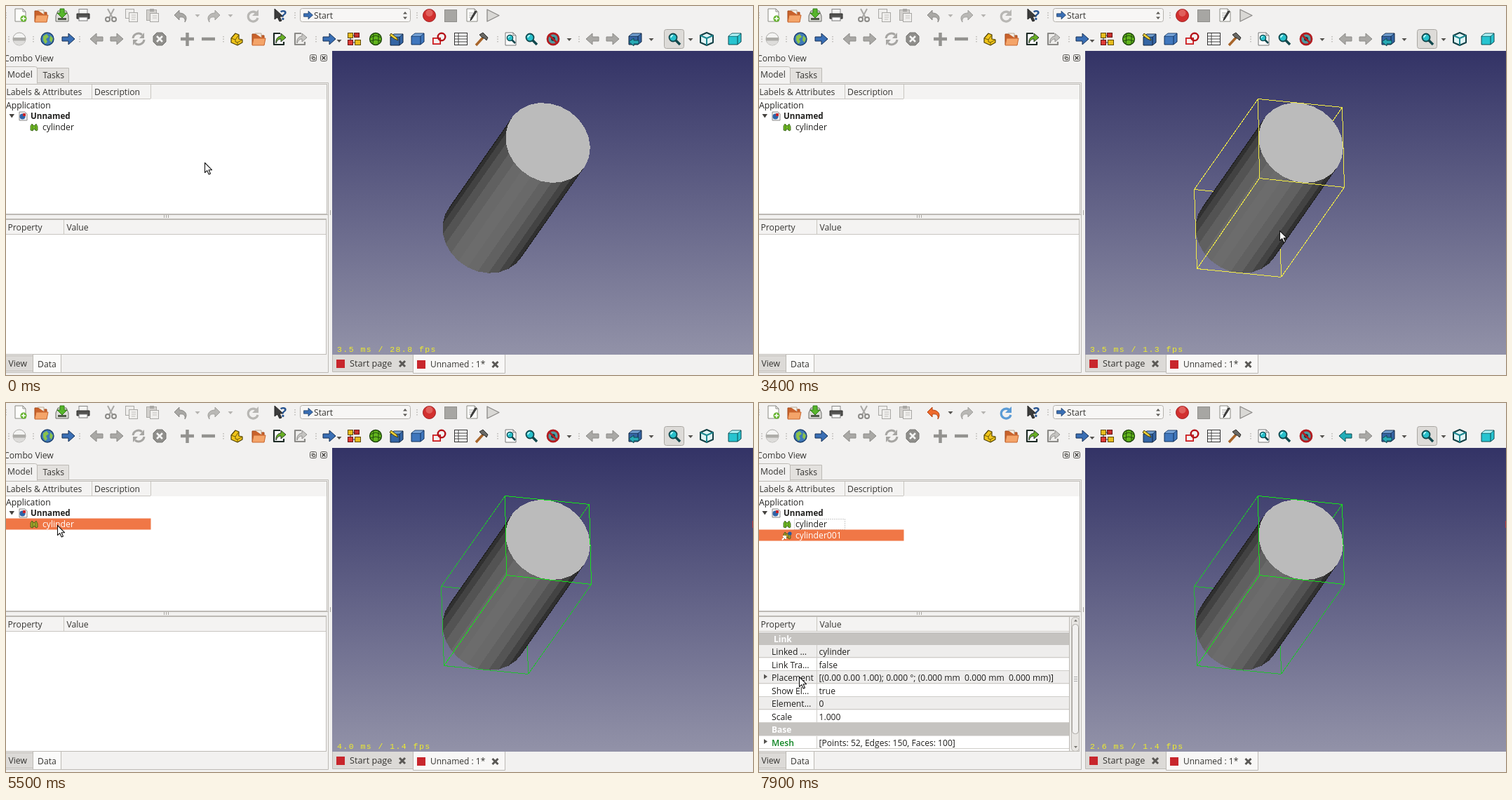
An HTML page that plays this animation: 1065 by 526 pixels, repeating every 8000 ms.

```html
<!DOCTYPE html>
<html lang="en">
<head>
<meta charset="utf-8">
<title>Mesh link demo</title>
<style>
html, body { margin: 0; width: 100%; height: 100%; overflow: hidden; background: #f2f1f0; }
svg { display: block; width: 1065px; height: 526px; }
text { font-family: "Open Sans", "Noto Sans", sans-serif; white-space: pre; }
#fps { font-family: "Liberation Mono", monospace; letter-spacing: 1.45px; }
</style>
</head>
<body>
<svg id="stage" viewBox="0 0 1065 526" xmlns="http://www.w3.org/2000/svg"></svg>
<script>
// ---- drawing helpers ----
const rect = (x, y, w, h, f, s = 'none', r = 0) =>
  `<rect x="${x}" y="${y}" width="${w}" height="${h}" fill="${f}" stroke="${s}" rx="${r}"/>`;
const path = (d, f = 'none', s = 'none', w = 1) =>
  `<path d="${d}" fill="${f}" stroke="${s}" stroke-width="${w}" stroke-linejoin="round"/>`;
const circ = (x, y, r, f, s = 'none', w = 1) =>
  `<circle cx="${x}" cy="${y}" r="${r}" fill="${f}" stroke="${s}" stroke-width="${w}"/>`;
const text = (x, y, s, f = '#353431', size = 12.2, weight = 400, id = '') =>
  `<text x="${x}" y="${y}" fill="${f}" font-size="${size}" font-weight="${weight}"${id && ` id="${id}"`}>${s}</text>`;
const at = (x, y, ...parts) => `<g transform="translate(${x} ${y})">${parts.join('')}</g>`;
const flip = s => `<g transform="scale(-1 1)">${s}</g>`;
const group = (id, ...parts) => `<g id="${id}">${parts.join('')}</g>`;
const line = (a, b) => `M${a}L${b}`;

// ---- icons, centred on 0,0 ----
const GREY = '#a9a8a5', DARK = '#8b8a87';
const arrow = (f, s) => path('M-9-3H0V-8L9 0L0 8V3H-9Z', f, s);
const drop = (x, y, f = '#8f8e8a') => path(`M${x - 3.5} ${y - 2}h7l-3.5 4Z`, f);
const grip = (x, y) => `<path d="M${x} ${y - 4}v9" stroke="#b9b7b3" stroke-width="1.5" stroke-dasharray="1.5 2"/>`;
const undo = (f, s) => path('M-9-1L-2-8V-4C6-4 11 2 6 9C7 3 4 1-2 2V6Z', f, s);
const reload = c => path('M6-3A7 7 0 1 0 7 3', 'none', c, 3.2) + path('M8-9V0H-1Z', c);
const page = (f = '#fdfdfb', s = '#8a8a84') => path('M-7-9H4L8-5V9H-7Z', f, s) + path('M4-9V-5H8', 'none', s);
const folder = path('M-9-7H-2L0-5H8V8H-9Z', '#c9622b', '#a3481b') + path('M-7-1H10L8 9H-9Z', '#f4a469', '#c9662e') + path('M-5-8H4V-2', '#f6efe6', '#b9a995');
const cube = (f, top, s) => path('M-9-4L-4-8H9V4L4 8H-9Z', f, s) + path('M-9-4H4V8M4-4L9-8', 'none', s) + path('M-8.500-4.200L-4-7.500H8L4-4.200Z', top);
const lens = c => path('M2 2L8 8', 'none', '#12484d', 3.5) + circ(-2, -2, 5.5, c, '#12484d', 1.8) + path('M-5-2A3 3 0 0 1-2-5', 'none', '#c8ffff', 1.6);
const share = (g, s, f) => path('M2-8H-7V8H7V4', f, s, 2.2) + path('M-4 6C-5 0-1-4 3-4V-8L10-2L3 4V0C-1 0-3 3-4 6Z', g, s, .9);
const mesh = f => path('M-5 4V-2L-3-5L0-2L3-5L5-1V4L3 5L0 2L-2 5Z', f, '#234d0c', .7) + path('M-2-4V4M2-3V4', 'none', '#315c16', .7);

function toolbars() {
  const top = [
    at(20, 13, page(), circ(5, 5, 4.5, '#65b32e'), path('M5 2V8M2 5H8', 'none', '#fff', 1.5)),
    at(50, 14, folder),
    at(80, 13, path('M-9 1L-6-6H6L9 1V9H-9Z', '#dcdcd8', '#6b6b67'), rect(-6, 4, 12, 3, '#4f5a48'), path('M-3-9H3V-3H7L0 4L-7-3H-3Z', '#57b62c', '#2d7a12')),
    at(110, 13, rect(-6, -8.5, 12, 8, '#f4f4f2', '#888'), path('M-9-2H9V5H-9Z', '#525250', '#2d2d2b'), rect(-6, 3, 12, 5, '#fafafa', '#777')),
    at(149, 13, path('M-4-9L3 4M5-9L-2 4', 'none', GREY, 2), circ(-4, 6, 3, 'none', DARK, 2), circ(5, 6, 3, 'none', DARK, 2)),
    at(179, 13, rect(-8.5, -8.5, 12, 13, '#efeeec', GREY), rect(-3.5, -3.5, 12, 13, '#efeeec', GREY), path('M0 0H6M0 3H6M0 6H5', 'none', '#c4c2bf')),
    at(209, 13, rect(-8.5, -7.5, 14, 15, '#d2d0cd', GREY), rect(-4, -9, 6, 4, GREY), rect(-3.5, -2.5, 12, 12, '#efeeec', GREY), path('M0 1H6M0 4H6', 'none', '#c4c2bf')),
    group('undoOff', at(249, 14, undo(GREY, DARK)), drop(273, 14, '#b5b3b0'), at(352, 14, reload('#b8b7b4'))),
    group('undoOn', at(249, 14, undo('#ee6a2c', '#b5400f')), drop(273, 14, '#55534f'), at(352, 14, reload('#5b9bd5'))),
    at(296, 14, flip(undo('#b9b8b5', '#a2a19e'))), drop(320, 14, '#b5b3b0'),
    at(391, 13, path('M-8-9V6L-4 3L-1 9L2 8L-1 2H4Z', '#3c3c3c', '#222'), text(0, 7, '?', '#27538f', 19, 700)),
    rect(419.5, 3.5, 157, 19, '#f7f6f5', '#b4b1ac', 3), at(431, 13, `<g transform="scale(.72)">${arrow('#3a6fb5', '#18375f')}</g>`),
    text(439, 17.500, 'Start'), path('M566 11.500l3-3.500l3 3.500ZM566 15.500l3 3.500l3-3.500Z', '#5c5a56'),
    circ(603.5, 13.5, 9, '#d2302f', '#a11d1f'), circ(603.5, 10, 5, '#e0605c'),
    rect(625.5, 5.5, 17, 17, '#a7a6a3', '#8f8e8b'),
    at(664, 13, page(), path('M-4-3H4M-4 0H4M-4 3H2', 'none', '#aaa'), path('M7-5L0 6L-2 8L-1 4L5-6Z', '#4a4a48', '#2a2a2a')),
    path('M686 5V22L703 13.500Z', '#d9d8d5', DARK, 1.3)
  ];
  const low = [
    at(19, 47, circ(0, 0, 9, '#f4f4f3', GREY), path('M-9 0A9 9 0 0 0 9 0Z', '#dddcda'), rect(-9, -2, 18, 4.5, '#aeada9')),
    at(59, 47, circ(0, 0, 9, '#3f79b9', '#1b3f6d', 1.4), path('M-6-4L-1-7L2-3L-2 0L0 4L-3 7L-6 2ZM4-5L8-1L6 5L3 2Z', '#8bc34a')),
    at(89, 47, arrow('#3a6fb5', '#142f55')),
    at(129, 47, flip(arrow(GREY, DARK))), at(158, 47, arrow(GREY, DARK)),
    at(189, 47, path('M-8-1A8 8 0 0 1 5-6M8 1A8 8 0 0 1-5 6', 'none', '#a6a5a2', 3), path('M8-9V-1H1ZM-8 9V1H-1Z', '#a6a5a2')),
    at(219, 47, path('M-4-9H4L9-4V4L4 9H-4L-9 4V-4Z', '#8f8e8b', '#777673'), path('M-4-4L4 4M4-4L-4 4', 'none', '#f5f5f4', 2.5)),
    path('M249 47H268M258.500 38V57', 'none', '#93928f', 4.500), path('M279 47H298', 'none', '#93928f', 4.500),
    at(329, 47, path('M-8-1L-2-8L3-6V0L8 1V5L1 9L-8 5Z', '#f0c419', '#4f4106', 1.2), path('M-8-1L-2 1L3-6M-2 1V4L1 5L8 1M1 5V9', 'none', '#6f5c0a')),
    at(360, 47, folder),
    group('hot', rect(376.5, 33.5, 27, 27, '#fbfbfa', '#a7a49f', 3)),
    at(389, 47, share('#68b023', '#1d2a25', '#fafafa')), at(419, 47, share('#c5c4c1', '#8b8a87', '#eeedeb')),
    at(461, 47, arrow('#3a6fb5', '#142f55')), drop(475, 50, '#55534f'),
    at(496, 47, rect(-8.5, -8.5, 7, 7, '#e6bc1d', '#604b08'), rect(.5, -8.500, 7, 6, '#c9312c', '#611'), rect(-8.5, 1.5, 7, 7, '#dd3b35', '#611'), rect(1.5, 1.5, 8, 7, '#e6bc1d', '#604b08'), path('M-1-5H2M-5-2V2M-1 5H2', 'none', '#333')),
    at(527, 47, circ(0, 0, 8.5, '#62b51d', '#1c420a', 1.3), path('M-8-2L0-5L8-2M-8 3L0 1L8 3M-3-8L-4 8M4-8L4 7', 'none', '#1f4a0c')),
    at(557, 48, cube('#3465a4', '#729fcf', '#10243f'), path('M-8-9L0-3L2 1L-3-1L-10-6Z', '#edd03a', '#4d4107')),
    at(587, 47, cube('#4077bd', '#79a5d8', '#10305b')),
    at(617, 47, rect(-8.5, -1.5, 11, 9, 'none', '#b41218'), rect(-7.5, -.5, 9, 7, 'none', '#ee4a4a'), circ(4, -3, 5.3, 'none', '#b41218', 2.4)),
    at(648, 47, rect(-8.5, -8.5, 18, 17, '#fbfbfa', '#333'), path('M-8-4H9M-8 0H9M-8 4H9M-3-8V8', 'none', '#444')),
    at(678, 47, path('M-8 9L3-3', 'none', '#a8652a', 3.5), path('M-3-6L2-9L9-2L7 2L4-1L1-2Z', '#686864', '#30302e')),
    at(719, 47, page('#fdfdfd', '#777'), `<g transform="translate(1 0) scale(.75)">${lens('#28c0cb')}</g>`),
    at(749, 47, lens('#28c0cb')),
    at(780, 47, circ(0, 0, 8, '#4f9ca2', '#b31c20', 2.8), circ(0, 0, 3, '#0f3d42'), path('M-5-5L5 5', 'none', '#b31c20', 2.8)), drop(803, 48, '#55534f'),
    group('backOff', at(836, 47, flip(arrow(GREY, DARK)))), group('backOn', at(836, 47, flip(arrow('#22adb8', '#0c484e')))),
    at(865, 47, arrow(GREY, DARK)),
    at(897, 47, cube('#3465a4', '#729fcf', '#10243f'), path('M-9 4L-2-1V2H5V7H-2V10Z', '#28aab5', '#0c484e')), drop(920, 48, '#55534f'),
    rect(938.5, 33.5, 28, 27, '#dddbd8', '#aaa7a2', 3), at(953, 47, lens('#28c0cb')), drop(976, 48, '#55534f'),
    at(999, 47, path('M0-9L9-5V5L0 9L-9 5V-5Z', '#dff4f5', '#123f44', 2), path('M-9-5L0-1L9-5M0-1V9', 'none', '#1b8891', 2)),
    at(1039, 47, cube('#27c4d0', '#b5f2f5', '#0c484e'))
  ];
  const grips = [[0, 13], [412, 13], [586, 13], [4, 47], [39, 47], [105, 47], [310, 47], [442, 47], [701, 47], [817, 47]];
  return top.join('') + low.join('') + grips.map(g => grip(...g)).join('');
}

// ---- left panel ----
const LINE = '#bdbab5', WHITE = '#fff', INK = '#1f1e1c';
const smallBtn = x => rect(x - 4.5, 69.5, 9, 9, '#f2f1f0', '#55534f', 2);
const treeRow = (y, f) => rect(0, y, 206.5, 16, f);

function propRow(i, name, value, open) {
  const mid = 336 + 18.5 * i, y = Math.round(mid - 9.5);
  if (!value) return rect(0, y, 456, 18.5, '#c5c3c0') + text(name === 'Link' ? 21 : 18, mid + 4.5, name, WHITE, 12, 700);
  const green = name === 'Mesh' && i > 2;
  return rect(0, y, 456, 19, i % 2 ? '#eeedec' : WHITE) +
    path(`M0 ${y + 17.5}H456M82.500 ${y}v19`, 'none', '#cfcdc9') +
    (open ? path(`M7 ${mid - 5}v7l5-3.500Z`, '#55534f') : '') +
    text(18, mid + 4.5, name, green ? '#0c8420' : INK, 12.2, green ? 600 : 400) + text(85.5, mid + 4.5, value, INK, 12.1);
}
const PLACE = '[(0.00 0.00 1.00); 0.000 °; (0.000 mm  0.000 mm  0.000 mm)]';
const MESH = '[Points: 52, Edges: 150, Faces: 100]';

function panel() {
  const base = [['Base'], ['Mesh', MESH, 1], ['Placement', PLACE, 1], ['Label', 'cylinder']];
  const link = [['Link'], ['Linked …', 'cylinder'], ['Link Tra…', 'false'], ['Placement', PLACE, 1], ['Show El…', 'true'],
    ['Element…', '0'], ['Scale', '1.000'], ['Base'], ['Mesh', MESH, 1]];
  const rows = list => list.map((r, i) => propRow(i, ...r)).join('');
  return [
    text(-3, 79, 'Combo View'), smallBtn(438), path('M436 76v-4h4M437.500 73.500h3v3h-3Z', 'none', '#55534f'),
    smallBtn(453), path('M450.500 71.500l5 5M455.500 71.500l-5 5', 'none', '#44423f', 1.5),
    path('M44.500 110.500V88.500H89.500V109.500', '#e3e1de', LINE), path('M-1 86.500H41.500Q44.500 86.500 44.500 89.500V109.500H459.500V522.500H-1', 'none', LINE),
    text(2, 102, 'Model'), text(52.5, 102.5, 'Tasks'),
    rect(-.5, 111.5, 458, 185, WHITE, LINE), rect(0, 112, 457, 21, '#f4f3f2'),
    path('M122.500 112V132M206.500 112V132M0 132.500H206', 'none', '#c9c6c1'),
    text(.5, 127, 'Labels &amp; Attributes'), text(126, 127, 'Description'),
    group('grey', treeRow(164.5, '#e1dfdd')), group('orange', treeRow(164.5, '#f07746')),
    text(0, 145.5, 'Application', INK), path('M4.500 154h7.500l-3.700 5.500Z', '#44423f'),
    at(24, 157, path('M-5-6H3L6-3V6H-5Z', '#f4f4f4', '#888'), circ(-.5, .5, 4, '#2f64a8'), rect(0, -4, 4, 4, '#c8272d')),
    text(35, 161, 'Unnamed', INK, 11.6, 700),
    group('iconPlain', at(40, 173, mesh('#73bd25'))), group('iconSel', at(40, 173, mesh('#a7a52c'))),
    text(52, 177, 'cylinder', INK, 12.2, 400, 'name'),
    group('linked',
      `<rect x="50.5" y="165.500" width="72" height="15" fill="none" stroke="#999" stroke-dasharray="1 2"/>`,
      treeRow(180.5, '#f07746'), at(40, 189, mesh('#b1952b'), path('M-7 6L-2 1M-6 1H-2V5', 'none', '#fff', 2), circ(4, -3, 2.6, '#2859a0')),
      text(52, 193, 'cylinder001', WHITE)),
    path('M0 297.500H459M0 303.500H457', 'none', LINE), path('M225.500 298v4M228.500 298v4M231.500 298v4', 'none', '#aaa7a2'),
    rect(-.5, 304.5, 457, 192, WHITE, LINE), rect(0, 305, 456, 21, '#f4f3f2'),
    path('M0 325.500H456M82.500 305V326', 'none', '#c9c6c1'), text(2.5, 320, 'Property'), text(86.5, 320, 'Value'),
    group('props', rows(base)),
    group('linkProps', `<g clip-path="url(#rows)">${rows(link)}</g>`, rect(442.5, 304.5, 14, 192, '#efeeec', LINE),
      rect(445.5, 305.5, 11, 191, '#e7e5e2', LINE, 5), rect(446.5, 315.5, 9, 156, '#f2f1f0', '#a9a6a1', 4),
      path('M449 311.500l2.500-3l2.500 3ZM449 489l2.500 3l2.500-3Z', '#77756f'), path('M449 390.500h5M449 393.500h5M449 396.500h5', 'none', '#aaa')),
    rect(-.5, 498.5, 39, 22, '#dcdad7', LINE), path('M38.500 497V522.500H78.500V497', '#fbfbfa', LINE),
    text(3.5, 514, 'View'), text(45, 515, 'Data'),
    path('M462.500 291v7', 'none', '#aaa7a2')
  ].join('');
}

// ---- 3D view ----
const topC = [772.5, 195], lowC = [682.5, 323.8];
const rim = ([x, y], a) => [x + 60.25 * Math.cos(a) + 1.4 * Math.sin(a), y + 6.1 * Math.cos(a) + 56.7 * Math.sin(a)].map(v => v.toFixed(1));
function cylinder(k) {
  const step = Math.PI * 2 / 25, grey = v => { const n = Math.round(v * k); return `rgb(${n},${n},${n})`; };
  let out = '', cap = [];
  for (let i = 0; i < 25; i++) {
    const a = i * step, b = a + step, lit = Math.cos((a + b) / 2 - 2.13);
    cap.push(rim(topC, a));
    if (lit > -.12) out += path(`M${rim(topC, a)}L${rim(topC, b)}L${rim(lowC, b)}L${rim(lowC, a)}Z`, grey(27 + 81 * Math.max(0, lit) ** 1.15));
  }
  return `<g shape-rendering="crispEdges">${out}${path('M' + cap.join('L') + 'Z', grey(187))}</g>`;
}
const mid = p => p.map(v => v + .5);
const T = [[711, 132], [831, 144], [834, 258], [713, 245]].map(mid);
const L = [[620, 261], [741, 273], [744, 386], [624, 374]].map(mid);
const backEdges = [0, 2].map(i => line(L[1], L[i])).join('') + line(L[1], T[1]);
const topEdges = `M${T.join('L')}Z`;
const lowEdges = `M${L[0]}L${L[3]}L${L[2]}` + [0, 2, 3].map(i => line(T[i], L[i])).join('');
const wire = (d, c) => `<path d="${d}" fill="none" stroke="${c}" shape-rendering="crispEdges"/>`;
const YEL = '#f3ec45', GRN = '#16e01c', GRN2 = '#22bd31';

function view() {
  const close = (x, y) => path(`M${x - 4} ${y - 4}l8 8m0-8l-8 8`, 'none', '#5a5855', 3);
  return [
    rect(465, 64, 600, 433, 'url(#sky)'),
    group('dimBack', wire(topEdges + lowEdges + backEdges, YEL)),
    group('hovBack', wire(backEdges, YEL)), group('selBack', wire(backEdges, GRN2)),
    group('solid', cylinder(1)), group('dim', cylinder(.755), `<g opacity=".24">${wire(topEdges + lowEdges + backEdges, YEL)}</g>`),
    group('hov', wire(topEdges + lowEdges, YEL)), group('sel', wire(lowEdges, GRN2), wire(topEdges + line(T[3], L[3]), GRN)),
    group('mark', rect(1064, 168, 1, 10, '#b8393d')),
    text(472, 493, '', '#f0ee2a', 11.5, 400, 'fps'),
    path('M465.500 497V521.500H580.500V497', '#dcdad7', LINE), path('M580.500 497V523.500H711.500V497', '#f8f7f6', LINE),
    rect(471, 504, 12, 12, '#c8262c'), text(490, 514, 'Start page', undefined, 12.7), close(565, 510),
    rect(586, 505, 12, 12, '#c8262c'), text(605, 515, 'Unnamed : 1*', undefined, 12), close(697.5, 511)
  ].join('');
}

const stage = document.getElementById('stage');
stage.innerHTML = `<defs><linearGradient id="sky" x2="0" y2="1"><stop stop-color="#333366"/><stop offset="1" stop-color="#9292a8"/></linearGradient>
<clipPath id="rows"><rect y="326" width="442" height="167"/></clipPath></defs>` +
  rect(0, 0, 1065, 526, '#f2f1f0') + toolbars() + panel() + view() +
  group('cursor', path('M.5.5V14.500L3.700 11.600L6.200 17L8.500 16L6.100 10.700H10.500Z', '#fff', '#151515', 1.1));

// ---- motion: times in tenths of a second ----
const moves = [ // start, steps, end point, optional bend
  [2, 9, [85, 172]], [17, 9, [735, 491]], [34, 1, [742, 320]], [36, 7, [723, 463]],
  [48, 8, [73, 174]], [57, 8, [401, 53], [290, 25]], [67, 9, [194, 186]], [76, 4, [57, 390]]
];
function pointer(s) {
  let p = [283, 223];
  for (const [start, n, to, bend] of moves) {
    if (s < start) break;
    const k = Math.min(1, (s - start + 1) / n), e = k * k * (3 - 2 * k);
    p = p.map((v, i) => {
      const ctrl = bend ? bend[i] : (v + to[i]) / 2;
      return (1 - e) ** 2 * v + 2 * e * (1 - e) * ctrl + e * e * to[i];
    });
  }
  return p.map(Math.round);
}
const rates = [[0, '3.5 ms / 28.8'], [12, '6.1 ms / 1.3'], [18, '3.9 ms / 1.4'], [34, '3.5 ms / 1.3'], [36, '4.2 ms / 3.8'], [54, '4.0 ms / 1.4'], [69, '2.6 ms / 1.4']];

const $ = id => document.getElementById(id);
const show = (on, ...ids) => ids.forEach(id => $(id).style.display = on ? '' : 'none');
function draw(ms) {
  const s = Math.floor(ms / 100), dim = s >= 12 && s < 18, hov = s >= 34 && s < 36, sel = s >= 36;
  const linked = s >= 69, active = s >= 55 && !linked;
  show(dim, 'dim', 'dimBack');
  show(!dim, 'solid');
  show(hov, 'hov', 'hovBack');
  show(sel, 'sel', 'selBack');
  show(sel && s < 55, 'grey');
  show(active, 'orange');
  show(s >= 55, 'mark');
  show(sel && !linked, 'iconSel');
  show(!sel || linked, 'iconPlain');
  show(sel && s !== 55 && !linked, 'props');
  show(linked, 'linked', 'linkProps', 'undoOn', 'backOn');
  show(!linked, 'undoOff', 'backOff');
  show(s >= 63 && s < 68, 'hot');
  $('name').setAttribute('fill', active ? WHITE : INK);
  $('fps').textContent = rates.filter(r => r[0] <= s).pop()[1] + ' fps';
  $('cursor').setAttribute('transform', `translate(${pointer(s)})`);
}
const began = performance.now();
function tick() {
  draw((performance.now() - began) % 8000);
  requestAnimationFrame(tick);
}
tick();
</script>
</body>
</html>
```
